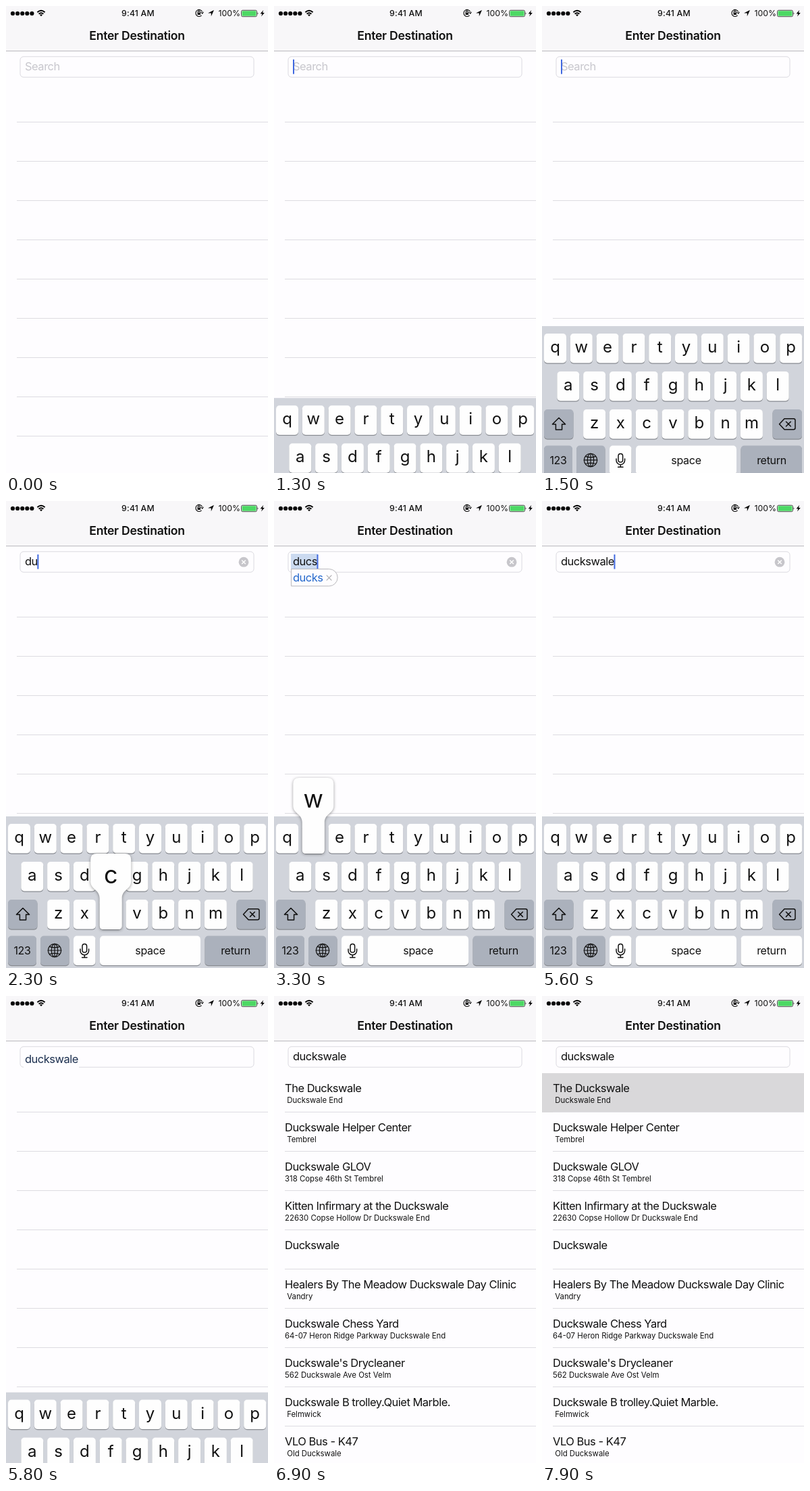
Recreate the animation shown at these times as an HTML page. Size 388 px wide and 690 px high, loop 8 s.

```html
<!DOCTYPE html>
<html lang="en">
<head>
<meta charset="utf-8">
<title>Destination search</title>
<style>
  html, body { margin: 0; width: 100%; height: 100%; overflow: hidden; background: #fefdff; }
  svg { display: block; width: 388px; height: 690px; font-family: Inter, sans-serif; }
  text { fill: #111; white-space: pre; }
  .mid { text-anchor: middle; }
  .status { font-size: 12.3px; font-weight: 500; letter-spacing: .2px; }
  .charge { font-size: 12.3px; }
  .heading { font-size: 17.6px; font-weight: 600; letter-spacing: -.28px; }
  .body { font-size: 16.5px; letter-spacing: -.5px; }
  .sub { font-size: 11.4px; }
  .letter { font-size: 24px; }
  .big { font-size: 36px; }
  .cap { font-size: 16px; letter-spacing: -.3px; }
  .paper { fill: #fefdff; }
  .shade { fill: #888b91; }
  .key { fill: #fefefe; }
  .func { fill: #abb1bc; }
  .line { fill: none; stroke: #111; stroke-width: 1.5; stroke-linejoin: round; stroke-linecap: round; }
  #hint { fill: #c8c7cd; }
  #guess { fill: #2468cc; }
  #popup path { fill: #fefefe; filter: drop-shadow(0 1px 2px #0006); }
</style>
</head>
<body>
<svg viewBox="0 0 388 690">
  <rect class="paper" width="388" height="690"/>
  <rect width="388" height="66" fill="#f8f7f9"/>
  <rect y="66" width="388" height="1" fill="#bbbabe"/>

  <g id="dots"></g>
  <g fill="none" stroke="#000" stroke-width="1.9">
    <path d="M46.4 9.3Q52 4.3 57.6 9.3M48.6 11.7Q52 8.8 55.4 11.7"/>
    <path d="M52 15.2L50 13.1Q52 11.6 54 13.1Z" fill="#000" stroke="none"/>
  </g>
  <text class="status mid" x="195.5" y="15">9:41 AM</text>
  <g fill="none" stroke="#000" stroke-width="1.1">
    <path d="M290.6 8.5A5 5 0 1 0 289.6 13.9M288.8 9.2L290.8 11.2L292.4 8.8"/>
    <path d="M284.3 10V8.6a1.5 1.5 0 0 1 3 0V10"/>
    <rect x="283.6" y="9.8" width="4.4" height="3.2" fill="#000" stroke="none"/>
  </g>
  <path d="M308 6L303.8 15.2V10.4H299Z"/>
  <text class="charge" x="314.5" y="15">100%</text>
  <rect class="paper" x="348.5" y="6.3" width="23" height="9.4" rx="2" stroke="#222" stroke-width=".8"/>
  <rect x="349.5" y="7.3" width="21" height="7.4" rx="1" fill="#4cd964"/>
  <path d="M372.6 9.2q1.8 1.8 0 3.6z"/>
  <path d="M381.2 6L376.6 11.4H379.4L378 15.6L382.8 9.9H380Z"/>
  <text class="heading mid" x="194" y="50">Enter Destination</text>

  <rect id="highlight" y="114" width="388" height="58" fill="#d9d8da"/>
  <g id="rules"></g>
  <g id="results"></g>

  <rect class="paper" x="21" y="74.8" width="346" height="30.4" rx="5" stroke="#dbdae0"/>
  <rect id="patch" class="paper" x="26" y="103" width="82" height="4"/>
  <rect id="select" x="25" y="78" height="23" fill="#cbdaf0"/>
  <text id="hint" class="body" x="28" y="95">Search</text>
  <text id="typed" class="body" x="28" y="95"></text>
  <rect id="cursor" y="79" width="2" height="21.5" fill="#4169e0"/>
  <g id="clear">
    <circle cx="352" cy="90.2" r="7.4" fill="#c7c6cb"/>
    <path d="M349.2 87.4l5.6 5.6m0-5.6l-5.6 5.6" stroke="#fff" stroke-width="1.4"/>
  </g>
  <g id="bubble">
    <path id="outline" class="paper" stroke="#b9b8bd"/>
    <text id="guess" class="body" x="28" y="119"></text>
    <path id="dismiss" d="M-3.8 109.7l7.6 7.6m0-7.6l-7.6 7.6" stroke="#aaa9ae" stroke-width="1.1"/>
  </g>

  <g id="board"></g>
</svg>
<script>
const LOOP = 8000, WORD = 'duckswale', PITCH = 38.8, KEY_W = 33, KEY_H = 43.5;
const $ = id => document.getElementById(id);
const show = (id, on) => $(id).setAttribute('visibility', on ? 'visible' : 'hidden');
const set = (id, attrs) => { for (const k in attrs) $(id).setAttribute(k, attrs[k]); };
const clamp = v => Math.min(1, Math.max(0, v));
const label = (cls, x, y, s) => `<text class="${cls}" x="${x}" y="${y}">${s}</text>`;

const places = [
  ['The Duckswale', ' Duckswale End'],
  ['Duckswale Helper Center', ' Tembrel'],
  ['Duckswale GLOV', '318 Copse 46th St Tembrel'],
  ['Kitten Infirmary at the Duckswale', '22630 Copse Hollow Dr Duckswale End'],
  ['Duckswale', ''],
  ['Healers By The Meadow Duckswale Day Clinic', ' Vandry'],
  ['Duckswale Chess Yard', '64-07 Heron Ridge Parkway Duckswale End'],
  ["Duckswale's Drycleaner", '562 Duckswale Ave Ost Velm'],
  ['Duckswale B trolley.Quiet Marble.', ' Felmwick'],
  ['VLO Bus - K47', ' Old Duckswale']
];

// letter, finger down, finger up
const presses = [
  ['d', 1990, 2090], ['u', 2190, 2290], ['c', 2290, 2390],
  ['s', 2590, 2690], ['w', 3290, 3390], ['a', 3790, 3890]
];

$('dots').innerHTML = [0, 1, 2, 3, 4].map(i => `<circle cx="${10 + i * 7.1}" cy="11" r="3.1"/>`).join('');
$('rules').innerHTML = places.slice(1).map((_, i) =>
  `<rect x="16" y="${171 + i * 58}" width="372" height="1" fill="#dddce1"/>`).join('');
$('results').innerHTML = places.map(([name, sub], i) =>
  label('body', 16, 142 + i * 58, name) + label('sub', 16, 157.5 + i * 58, sub)).join('');

// Keyboard, laid out at its resting place
const keys = {};
const cap = (x, y, w, cls = 'key', id = '') =>
  `<rect class="shade" x="${x}" y="${y + 1.2}" width="${w}" height="${KEY_H}" rx="5"/>` +
  `<rect class="${cls}" ${id && `id="${id}"`} x="${x}" y="${y}" width="${w}" height="${KEY_H}" rx="5"/>`;

function buildBoard() {
  let out = '<rect y="466" width="388" height="230" fill="#d1d4db"/>';
  [['qwertyuiop', 3, 477], ['asdfghjkl', 22.3, 533], ['zxcvbnm', 61.1, 589]].forEach(([row, x0, y]) => {
    [...row].forEach((ch, i) => {
      const x = x0 + i * PITCH;
      keys[ch] = { x, y };
      out += cap(x, y, KEY_W) + label('letter mid', x + KEY_W / 2, y + 28, ch);
    });
  });
  out += cap(3, 589, 43.5, 'func') + cap(341.5, 589, 43.5, 'func');
  out += cap(3, 642.5, 42, 'func') + cap(51, 642.5, 42.5, 'func') + cap(100, 642.5, 32.5);
  out += cap(139, 642.5, 149) + cap(294.5, 642.5, 90.5, 'func', 'enter');
  out += label('cap mid', 24, 670, '123') + label('cap mid', 213.5, 670, 'space') + label('cap mid', 340, 670, 'return');
  out += `<g class="line">
    <path d="M25 601.5L34.6 611.1H29.6V619.1H20.4V611.1H15.4Z"/>
    <path d="M359 602.7H372.5q2.5 0 2.5 2.5V616.2q0 2.5-2.5 2.5H359L351.5 610.7ZM361.5 607.3l6.8 6.8m0-6.8l-6.8 6.8"/>
    <g stroke-width="1.2"><circle cx="72" cy="664" r="9.7"/><ellipse cx="72" cy="664" rx="4.7" ry="9.7"/>
    <path d="M72 654.3V673.7M62.3 664H81.7M64.4 658.4Q72 661.4 79.6 658.4M64.4 669.6Q72 666.6 79.6 669.6"/></g>
    <rect x="113" y="654.5" width="6.6" height="12.6" rx="3.3"/>
    <path d="M110 662v2.4a6.3 6.3 0 0 0 12.6 0V662M116.3 670.8V674.4M112.6 674.4H120"/>
  </g><g id="popup"><path id="flag"/><text id="face" class="big mid"></text></g>`;
  $('board').innerHTML = out;
}

function drawPopup(ch) {
  show('popup', ch);
  if (!ch) return;
  const { x, y } = keys[ch];
  set('flag', { d: `M${x - 4.5} ${y - 68}H${x + 37.5}q9 0 9 9V${y - 27}c0 12-13.5 12-13.5 25V${y + 39}q0 5-5 5H${x + 5}q-5 0-5-5V${y - 2}c0-13-13.5-13-13.5-25V${y - 59}q0-9 9-9z` });
  set('face', { x: x + KEY_W / 2, y: y - 24 });
  $('face').textContent = ch;
}

function drawBubble(word) {
  show('bubble', word);
  if (!word) return;
  $('guess').textContent = word;
  const w = $('guess').getComputedTextLength();
  set('outline', { d: `M25.5 100.5H${w + 37}a12.6 12.6 0 0 1 0 25.2H25.5Z` });
  set('dismiss', { transform: `translate(${w + 37} 0)` });
}

// Critically damped spring: part of the way still to go
const remaining = ms => {
  const s = Math.max(0, ms) * .01826;
  return (1 + s) * Math.exp(-s);
};

function render(t) {
  const accepted = t >= 5490, closing = t >= 5690, editing = t >= 1290 && !closing;
  const text = accepted ? WORD : presses.filter(p => t >= p[2]).map(p => p[0]).join('');
  const pressed = presses.find(p => t >= p[1] && t < p[2]);
  const guess = accepted ? '' : t >= 3990 ? WORD : t >= 2990 && t < 3390 ? 'ducks' : '';

  const hidden = closing ? 1 - remaining(t - 5703) : remaining(t - 1210);
  set('board', { transform: `translate(0 ${(224 * hidden).toFixed(2)})` });
  show('board', hidden < .999);
  drawPopup(pressed && pressed[0]);
  $('enter').style.fill = accepted && t < 5640 ? '#fefefe' : '';

  // The field's text drops a little and settles as editing ends
  const settle = clamp((t - 5690) / 300), settling = closing && settle < 1;
  $('typed').textContent = text;
  set('typed', { y: 95 + (settling ? 4 * (1 - settle ** 3) : 0) });
  $('typed').style.fill = settling ? '#1d3050' : '';
  show('patch', settling);
  show('hint', !text);
  show('clear', text && !closing);

  const end = text ? $('typed').getComputedTextLength() : 0;
  const lit = 1 - clamp((t - 4450) / 100) + clamp((t - 4950) / 50);
  set('cursor', { x: 28 + end - (text ? .5 : 0), opacity: lit });
  show('cursor', editing);
  set('select', { width: end + 3.5 });
  show('select', guess);
  drawBubble(guess);

  show('results', t >= 6090);
  show('highlight', t >= 7290);
}

buildBoard();
const start = performance.now();
function tick() {
  render((performance.now() - start) % LOOP);
  requestAnimationFrame(tick);
}
tick();
</script>
</body>
</html>
```
